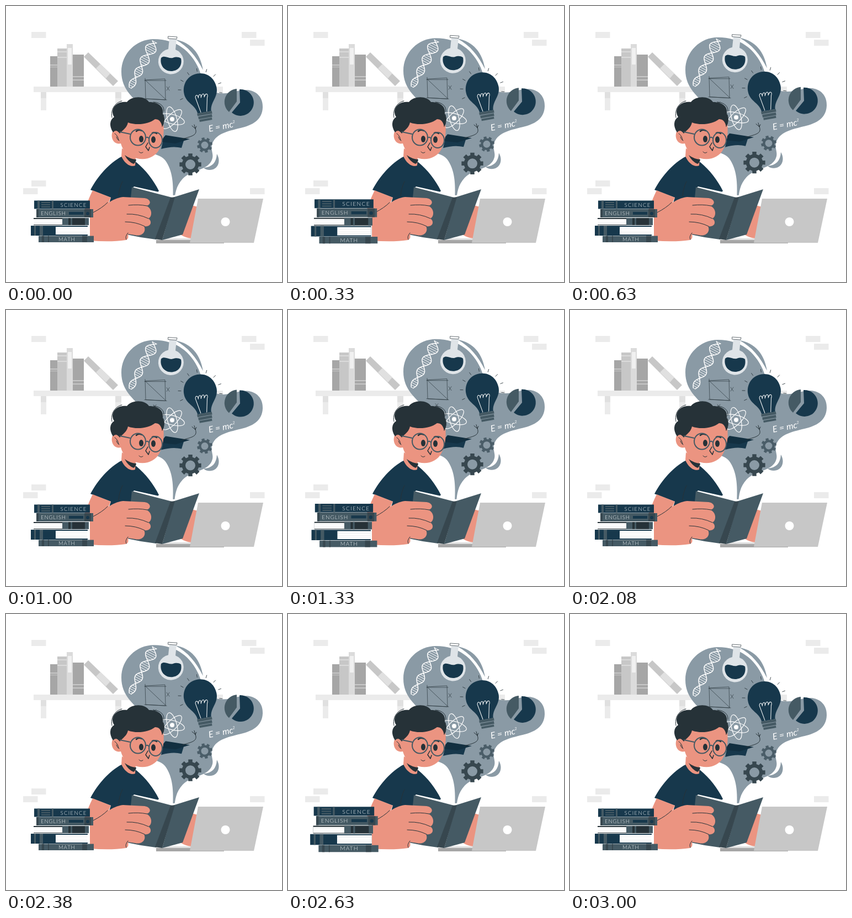
Write an HTML page that moves like this. It is 500x500 px and loops after 3040 ms.

```html
<!DOCTYPE html>
<html lang="en">
<head>
<meta charset="utf-8">
<title>Studying</title>
<style>
html,body{margin:0;width:100%;height:100%;overflow:hidden;background:#fff}
svg{display:block;width:100vw;height:100vh}
.navy{fill:#17384c}.slate{fill:#455a64}.deep{fill:#37474f}.dark{fill:#263238}.skin{fill:#eb9481}.fog{fill:#8a9aa5}.pale{fill:#ebebeb}.white{fill:#fff}
.line,.chalk{fill:none;stroke:#263238;stroke-linecap:round;stroke-linejoin:round}
.chalk{stroke:#fff}
.label{fill:#edf1f3;font:300 9.6px Lato,sans-serif;letter-spacing:.9px}
</style>
</head>
<body>
<svg viewBox="0 0 500 500">
  <g id="bricks" class="pale"></g>
  <path class="pale" d="M50 146H393V156H209V189H198V156H73V189H63V156H50Z"/>
  <path fill="#e0e0e0" d="M63 156H73V167H63ZM198 156H209V167H198Z"/>
  <g>
    <path fill="#a6a6a6" d="M80 91H94V146H80ZM121 88H141V146H121Z"/>
    <path fill="#c7c7c7" d="M93 77H110V146H93ZM80 106H94V108H80ZM80 110H94V111H80ZM121 127H141V129H121ZM121 133H141V135H121Z"/>
    <path fill="#dbdbdb" d="M110 69H121V146H110ZM93 82H110V84H93ZM93 92H110V94H93Z"/>
    <path fill="#f0f0f0" d="M112 76H119V106H112Z"/>
    <path fill="#c7c7c7" d="M141 92L149 84L203 136L194 145Z"/>
    <path fill="#e0e0e0" d="M163 113L171 105L189 122L181 131Z"/>
  </g>

  <g id="ideas">
    <path class="fog" d="M302 356C304 322 302 298 288 279C280 270 272 270 257 264C240 250 262 211 244 183C233 166 209 153 209 119C209 86 236 60 268 60C309 60 335 82 349 113C357 134 366 157 388 158C408 160 416 152 436 152C454 153 466 166 465 184C464 207 446 216 425 221C400 227 378 232 373 252C371 264 378 270 372 281C363 298 335 297 320 313C308 326 306 340 305 356Z"/>
    <path class="fog" d="M307 61C336 66 352 86 357 116C344 91 330 73 307 61ZM382 268C390 281 384 297 369 297Q362 297 358 293C373 292 381 284 382 268Z"/>
    <g id="helix" class="chalk"></g>

    <path fill="#dfe4e8" d="M296 59L309 60L307 79A23 23 0 1 1 294 78Z"/>
    <path class="line" stroke-width=".7" style="fill:#fff" d="M294 55L310 56L309 60L294 59Z"/>
    <path class="navy" d="M281 94C287 88 295 96 302 94C308 92 312 92 317 95C320 109 311 118 299 118C287 118 278 107 281 94Z"/>

    <path class="line" stroke-width=".65" d="M252 134L288 132L289 170L253 168L252 131M251 135H290M253 135L289 169M251 168L291 170M291 146L296 153M296 146L291 153M267 177L272 183M272 177L267 183"/>

    <g id="atom" class="chalk" stroke-width="1.2"></g>
    <circle class="white" cx="301" cy="205" r="4"/>

    <g transform="rotate(-10 352 153)">
      <path class="navy" d="M352 122C370 122 382 136 382 153C382 171 366 177 365 193H340C339 177 322 171 322 153C322 136 334 122 352 122Z"/>
      <path class="slate" d="M339 193H366V198H339ZM340 199H365V204H340ZM341 205H364V209H341Z"/>
      <path class="chalk" stroke-width="1" d="M346 192L341 164C342 158 347 160 346 166C348 158 353 158 351 166C354 158 359 158 357 166C361 158 366 161 362 168L357 192"/>
      <path id="rays" class="line" stroke-width=".8"/>
    </g>

    <path class="navy" d="M424 175L423 151A24 24 0 1 1 409 193Z"/>
    <path class="slate" d="M418 173L404 192A24 24 0 0 1 418 150Z"/>
    <text x="368" y="228" transform="rotate(-11 368 228)" fill="#fff" style="font:italic 400 16px Lato,sans-serif">E = mc<tspan font-size="7" dy="-7">2</tspan></text>

    <path class="navy" d="M284 246L322 244L318 257Q302 253 281 259Z"/>
    <path fill="#122f40" d="M289 234L333 241L307 249L279 246Z"/>
    <path class="line" d="M319 241C337 236 348 234 343 222M343 222L337 217M343 222L341 215M343 222L345 218"/>
    <path id="gearBig" fill="#37474f" fill-rule="evenodd"/>
    <path id="gearSmall" fill="#4a5d68" fill-rule="evenodd"/>
  </g>

  <g>
    <path fill="#a6a6a6" d="M272 422H395V430H272Z"/>
    <path fill="#dedede" d="M272 421H335V424H272Z"/>
    <path class="skin" d="M336 361L348 364L336 421Q325 420 316 414Z"/>
    <path fill="#c7c7c7" d="M348 349H466L449 429H333Z"/>
    <circle class="white" cx="397.500" cy="391" r="8"/>
  </g>

  <g>
    <path class="navy" d="M209 273C187 285 167 307 153 333L190 347L184 366H245L277 335C267 315 253 297 236 283Z"/>
    <path class="skin" d="M157 334L190 347L182 364L160 380L140 376Q148 352 157 334Z"/>
    <path class="line" d="M211 318Q205 330 204 344"/>
    <path class="skin" d="M210 258L209 272C214 285 226 293 234 289L235 274Z"/>
    <path class="dark" d="M215 270Q224 277 236 278Q235 284 231 286Q221 282 215 270Z"/>
  </g>

  <g>
    <path class="skin" d="M205 212C218 193 270 188 283 204C288 222 286 244 278 259C270 275 252 280 237 276C222 273 212 264 208 249C194 252 189 237 193 228Q198 223 205 229Z"/>
    <path class="dark" d="M194 229C187 218 187 207 196 201C187 187 200 171 219 174C229 162 252 163 259 174C277 174 286 183 284 195C288 204 286 213 283 219C281 209 277 205 270 205C258 214 237 217 221 211C219 221 211 225 206 231Q199 222 194 229Z"/>
    <path class="line" d="M192 202C189 188 197 175 210 172M267 174C281 175 287 183 286 191M285 197Q289 208 283 218M197 231Q203 235 204 243M200 237Q201 242 205 244"/>
    <path class="line" stroke-width="2.500" d="M236 227Q240 223 246 226M265 230Q269 228 273 231"/>
    <ellipse class="dark" cx="245" cy="241" rx="4" ry="6"/>
    <ellipse class="dark" cx="267" cy="242" rx="4" ry="6"/>
    <g fill="none" stroke="#455a64" stroke-width="2">
      <ellipse cx="239" cy="238" rx="14" ry="14.500"/>
      <ellipse cx="271" cy="243" rx="12" ry="14"/>
      <path d="M253 239Q256 236 259 240M225 232L206 228"/>
    </g>
    <path class="line" stroke-width="1.5" d="M257 248L253 255L258 262L260 256"/>
    <path class="line" d="M241 264Q244 268 248 265"/>
  </g>

  <g>
    <path class="white" d="M228 331L232 327L304 343L350 331L345 336L304 348Z"/>
    <path class="slate" d="M228 328L301 347L272 423Q245 420 219 414Z"/>
    <path class="slate" d="M305 346L350 332L320 414L283 424Z"/>
    <path class="deep" d="M298 347L306 346L283 424L270 422Z"/>
    <path class="skin" d="M152 380C175 364 192 348 212 346L251 348C263 350 264 360 254 362C266 367 265 382 258 385C266 391 262 401 250 399C255 409 246 418 234 415L221 413C222 419 222 422 217 424Q190 428 152 425Z"/>
    <path class="line" d="M222 361Q240 359 255 362M219 377Q239 376 258 385M216 391Q235 391 251 399M221 411Q215 418 218 423M158 374Q174 366 184 356"/>
  </g>

  <g id="stack">
    <path class="navy" d="M51 352.500H152V367.500H51Z"/>
    <path class="slate" d="M57 352.500H61V367.500H57ZM64 355H80V357H64ZM64 359H80V361H64ZM64 363H80V365H64ZM83 352.500H86V367.500H83Z"/>
    <text class="label" style="letter-spacing:1.3px" x="98.500" y="363.800">SCIENCE</text>
    <path class="slate" d="M55 368H158V383H55Z"/>
    <path class="deep" d="M55 368H59V383H55ZM142 368H154V383H142Z"/>
    <path class="navy" d="M114 373H140V378H114Z"/>
    <circle class="navy" cx="148" cy="376" r="3"/>
    <text class="label" x="63" y="379">ENGLISH</text>
    <path class="dark" d="M50 384H150V397H50Z"/>
    <path class="white" d="M50 386H102V396H50Z"/>
    <path class="slate" d="M102 384H113V397H102ZM117 384H120V397H117ZM143 384H150V397H143Z"/>
    <path class="navy" d="M45 398H148V416H45Z"/>
    <path class="white" d="M90 400H148V414H90Z"/>
    <path class="slate" d="M51 398H54V416H51ZM61 398H67V416H61Z"/>
    <path stroke="#dfe3e5" stroke-width=".6" d="M51 389H101M51 393H101M91 404H147M91 408H147M91 411H147"/>
    <path class="slate" d="M59 416.500H159V428H59Z"/>
    <path class="deep" d="M65 416.500H69V428H65ZM76 416.500H78V428H76ZM138 416.500H147V428H138Z"/>
    <text class="label" x="95" y="425.500">MATH</text>
  </g>
</svg>
<script>
const LOOP = 3040;
const el = id => document.getElementById(id);
const polar = (cx, cy, r, a) => `${(cx + r * Math.cos(a)).toFixed(2)} ${(cy + r * Math.sin(a)).toFixed(2)}`;

function gear(cx, cy, outer, hole, tilt) {
  const teeth = 8, root = outer * .77, pts = [];
  for (let i = 0; i < teeth; i++) {
    const a = tilt + i * 2 * Math.PI / teeth;
    pts.push(polar(cx, cy, root, a - .24), polar(cx, cy, outer, a - .19),
             polar(cx, cy, outer, a + .19), polar(cx, cy, root, a + .24));
  }
  return `M${pts.join('L')}ZM${cx - hole} ${cy}a${hole} ${hole} 0 1 0 ${2 * hole} 0a${hole} ${hole} 0 1 0 ${-2 * hole} 0Z`;
}

function helix() {
  const point = (u, side) => {
    const w = side * (5 + 6 * u) * Math.sin(u * Math.PI * 4 + .4);
    return `${(225 + 44 * u + w * .88).toFixed(1)} ${(148 - 83 * u + w * .47).toFixed(1)}`;
  };
  const strand = side => 'M' + Array.from({length: 61}, (_, i) => point(i / 60, side)).join('L');
  let rungs = '';
  for (let i = 0; i <= 24; i++) rungs += `M${point(i / 24, 1)}L${point(i / 24, -1)}`;
  return `<path d="${strand(1)}${strand(-1)}" stroke-width="1.5"/><path d="${rungs}" stroke-width="1"/>`;
}

function rays() {
  let d = '';
  for (let i = 0; i < 9; i++) {
    const a = -3.4 + i * .46;
    d += `M${polar(352, 153, 35, a)}L${polar(352, 153, 40, a)}`;
  }
  return d;
}

el('bricks').innerHTML = [[46, 47], [427, 47], [442, 61], [46, 316], [31, 330], [442, 330]]
  .map(([x, y]) => `<rect x="${x}" y="${y}" width="26.5" height="11"/>`).join('');
el('atom').innerHTML = [15, 75, 135]
  .map(a => `<ellipse cx="301" cy="205" rx="23" ry="8.500" transform="rotate(${a} 301 205)"/>`).join('');
el('helix').innerHTML = helix();
el('rays').setAttribute('d', rays());
el('gearBig').setAttribute('d', gear(334, 287, 20, 9, 0));
el('gearSmall').setAttribute('d', gear(360, 252, 14, 6.5, .54));

// Piecewise-linear track of [time, value] pairs.
function track(keys, t) {
  for (let i = 1; i < keys.length; i++) {
    const [t0, v0] = keys[i - 1], [t1, v1] = keys[i];
    if (t <= t1) return v0 + (v1 - v0) * (t - t0) / (t1 - t0);
  }
  return keys[keys.length - 1][1];
}
const RISE = [[0, 0], [630, 3.3], [1330, 7.3], [1730, 9.8], [2080, 6], [2630, 2], [3000, 0]];
const BEAT = [[0, 0], [30, 0], [150, .1], [265, 0], [380, .1], [500, 0]];

function draw(t) {
  const rise = track(RISE, t);
  const beat = t < 3000 ? 1 + track(BEAT, t % 1250) : 1;
  el('ideas').setAttribute('transform', `translate(0 ${-rise})`);
  el('stack').setAttribute('transform', `translate(102.5 390) scale(${beat}) translate(-102.5 -390)`);
}

const start = performance.now();
function tick() {
  draw((performance.now() - start) % LOOP);
  requestAnimationFrame(tick);
}
tick();
</script>
</body>
</html>
```
